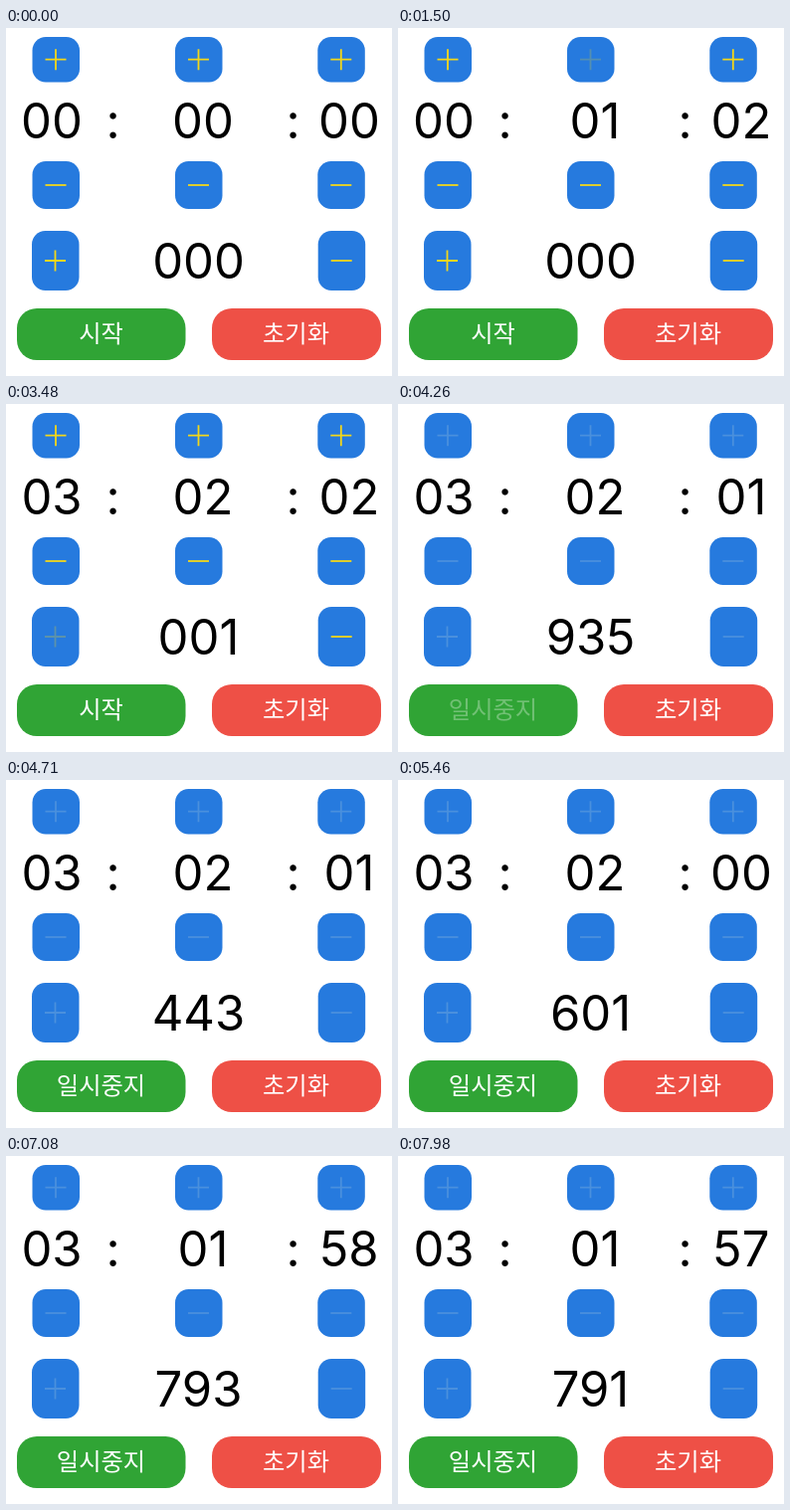
An HTML page that plays this animation: 388x350 px, repeating every 8 s.

```html
<!DOCTYPE html>
<html lang="ko">
<head>
<meta charset="utf-8">
<title>Timer</title>
<style>
html, body { margin: 0; width: 100%; height: 100%; overflow: hidden; background: #fff; }
svg { display: block; width: 100vw; height: 100vh; }
text { text-anchor: middle; }
.num { font: 400 49px Inter, "Liberation Sans", sans-serif; }
.label { font: 300 24.3px "Noto Sans CJK KR", "Noto Sans CJK", sans-serif; fill: #fff; }
.sign { stroke-width: 1.8; fill: none; }
</style>
</head>
<body>
<svg id="stage" viewBox="0 0 388 350"></svg>
<script>
const LOOP = 8000, FRAME = 30, START = 4200;
const BLUE = '#267ade', YELLOW = '#f3d719', OFF = '#4a90dd';

// Release times of the taps on each plus button
const taps = { hour: [2270, 2560, 2850], min: [1480, 1860], sec: [690, 1110], ms: [3440] };
// Countdown progress: [time, elapsed ms]
const run = [[START, 0], [4710, 558], [6180, 2209], [7080, 3208], [7980, 4210]];

const stage = document.getElementById('stage');

function add(tag, attrs, content = '') {
  const el = document.createElementNS('http://www.w3.org/2000/svg', tag);
  for (const key in attrs) el.setAttribute(key, attrs[key]);
  el.textContent = content;
  return stage.appendChild(el);
}

function box(x, y, width, height, rx, fill) {
  add('rect', { x, y, width, height, rx, fill });
}

const signs = [];
function button(x, y, height, cy, plus) {
  box(x, y, 47.5, height, 13.5, BLUE);
  const cx = x + 23.5;
  const d = `M${cx - 10.5} ${cy}h21` + (plus ? `M${cx} ${cy - 10.5}v21` : '');
  const el = add('path', { class: 'sign', d });
  signs.push(el);
  return el;
}

const number = (x, y, s) => add('text', { class: 'num', x, y }, s);
const label = (x, s) => add('text', { class: 'label', x, y: 316 }, s);

const plus = {}, digits = {};
[['hour', 26.5, 46], ['min', 170, 198], ['sec', 313.3, 345]].forEach(([name, x, cx]) => {
  plus[name] = button(x, 9, 45.5, 31.7, true);
  button(x, 134, 48, 158, false);
  digits[name] = number(cx, 110.5);
});
plus.ms = button(26, 204, 60, 234, true);
button(313.7, 204, 60, 234, false);
digits.ms = number(193.5, 252);
number(107.5, 110.5, ':');
number(288.5, 110.5, ':');

box(11, 282, 169.5, 52, 20, '#30a435');
box(207, 282, 170, 52, 20, '#ee5046');
const action = label(95.5);
label(291.5, '초기화');

// Pressed titles go faint, then fade back after release
function glow(t, releases, hold = 80) {
  return releases.reduce((value, up) => {
    if (t < up - hold || t > up + 280) return value;
    const p = Math.max(0, (t - up) / 280);
    return 0.22 + 0.78 * p * p * (3 - 2 * p);
  }, 1);
}

function elapsed(t) {
  if (t <= START) return 0;
  const i = run.findIndex(([end]) => t <= end);
  const [t0, v0] = run[i - 1], [t1, v1] = run[i];
  return Math.round(v0 + (v1 - v0) * (t - t0) / (t1 - t0));
}

function draw() {
  const t = Math.floor(performance.now() % LOOP / FRAME) * FRAME;
  const running = t >= START;
  const count = name => taps[name].filter(up => t >= up).length;
  const left = ((count('hour') * 60 + count('min')) * 60 + count('sec')) * 1000
    + count('ms') - elapsed(t);
  const s = Math.floor(left / 1000);
  const values = {
    hour: Math.floor(s / 3600),
    min: Math.floor(s / 60) % 60,
    sec: s % 60,
    ms: left % 1000
  };

  for (const el of signs) el.setAttribute('stroke', running ? OFF : YELLOW);
  for (const name in values) {
    digits[name].textContent = String(values[name]).padStart(name === 'ms' ? 3 : 2, '0');
    plus[name].setAttribute('opacity', glow(t, taps[name]));
  }
  action.textContent = running ? '일시중지' : '시작';
  action.setAttribute('opacity', glow(t, [START], 300));
  requestAnimationFrame(draw);
}
draw();
</script>
</body>
</html>
```
